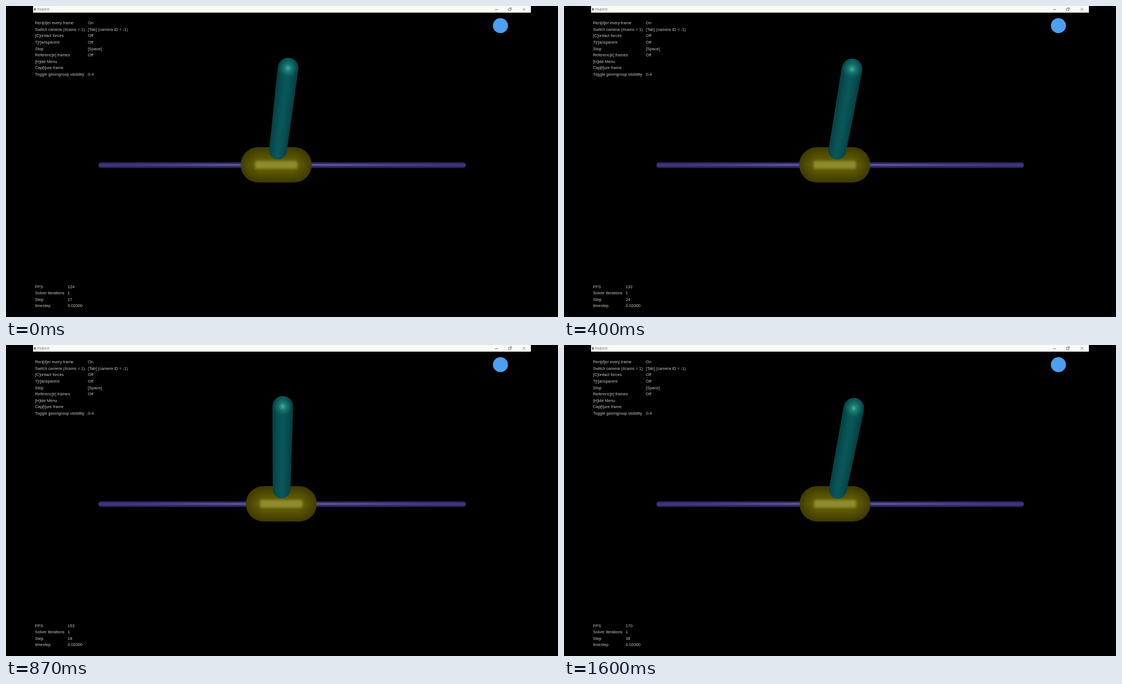
These frames come from a looping animation (997 by 562 pixels, 1.67 s). An HTML page with a canvas:

```html
<!DOCTYPE html>
<html lang="en">
<head>
<meta charset="utf-8">
<title>Inverted pendulum</title>
<style>
  html, body { margin: 0; width: 100%; height: 100%; overflow: hidden; background: #000; }
  canvas { display: block; }
</style>
</head>
<body>
<canvas id="stage" width="997" height="562"></canvas>
<script>
const ctx = document.getElementById('stage').getContext('2d');
const LOOP = 1670, TICK = 200 / 3, LAST_TICK = 24;
const AXIS_Y = 287, POLE_LENGTH = 176;

// Each phase runs until the tick where the next begins. The pole falls past
// its limit, a new episode starts upright, pauses once and falls again.
const PHASES = [
  { tick: 0, from: { cart: 488, tip: 509.5, step: 17, fps: 124 }, to: { cart: 488.3, tip: 510, step: 17, fps: 128 } },
  { tick: 4, from: { cart: 488.3, tip: 510, step: 17, fps: 128 }, to: { cart: 489.5, tip: 528, step: 27, fps: 134 } },
  { tick: 7, from: { cart: 499, tip: 498.5, step: 0, fps: 135 }, to: { cart: 499, tip: 498.5, step: 8, fps: 136 } },
  { tick: 10, from: { cart: 499, tip: 498.5, step: 8, fps: 136 }, to: { cart: 494.5, tip: 502, step: 28, fps: 170 } },
  { tick: 16, from: { cart: 494.5, tip: 502, step: 28, fps: 170 }, to: { cart: 494.5, tip: 502, step: 28, fps: 170 } },
  { tick: 21, from: { cart: 494.5, tip: 502, step: 28, fps: 170 }, to: { cart: 489.5, tip: 523.5, step: 38, fps: 170 } },
];

const MENU = [
  ['Ren[d]er every frame', 'On'],
  ['Switch camera (#cams = 1)', '[Tab] (camera ID = -1)'],
  ['[C]ontact forces', 'Off'],
  ['T[r]ansparent', 'Off'],
  ['Stop', '[Space]'],
  ['Referenc[e] frames', 'Off'],
  ['[H]ide Menu', ''],
  ['Cap[t]ure frame', ''],
  ['Toggle geomgroup visibility', '0-4'],
];

function poseAt(tick) {
  const i = PHASES.findLastIndex(phase => phase.tick <= tick);
  const { tick: begin, from, to } = PHASES[i];
  const end = PHASES[i + 1]?.tick ?? LAST_TICK;
  const linear = (tick - begin) / (end - begin);
  const falling = linear ** 1.4;
  const mix = (name, k) => from[name] + (to[name] - from[name]) * k;
  return {
    cart: mix('cart', falling),
    tip: mix('tip', falling),
    step: Math.round(mix('step', linear)),
    fps: Math.round(mix('fps', linear)),
  };
}

function shade(gradient, ...colors) {
  colors.forEach((color, i) => gradient.addColorStop(i / (colors.length - 1), color));
  return gradient;
}

function text(str, x, y, color = '#c4c4c4', size = 7.4) {
  ctx.font = `${size}px "Liberation Sans", Arial, sans-serif`;
  ctx.fillStyle = color;
  ctx.fillText(str, x, y);
}

function table(rows, top, valueX) {
  rows.forEach(([label, value], i) => {
    const y = top + i * 11.62;
    text(label, 52.5, y);
    text(value, valueX, y);
  });
}

function capsule(x, y, w, h, fill) {
  ctx.fillStyle = fill;
  ctx.beginPath();
  ctx.roundRect(x, y, w, h, h / 2);
  ctx.fill();
}

function drawWindowBar() {
  ctx.fillStyle = '#fbfbf6';
  ctx.fillRect(49, 0, 899, 12);
  ctx.fillStyle = '#555';
  ctx.fillRect(51, 4, 2.5, 4);
  text('mujoco', 56, 6.5, '#777', 7);
  ctx.strokeStyle = '#888';
  ctx.lineWidth = 1;
  ctx.beginPath();
  ctx.moveTo(883, 6.5); ctx.lineTo(889, 6.5);
  ctx.rect(907.5, 4.5, 4, 4);
  ctx.moveTo(909, 3); ctx.lineTo(913, 3); ctx.lineTo(913, 7);
  ctx.moveTo(933, 3.5); ctx.lineTo(938, 8.5);
  ctx.moveTo(938, 3.5); ctx.lineTo(933, 8.5);
  ctx.stroke();
}

function drawRail() {
  capsule(167, 282.2, 663.5, 10.6,
    shade(ctx.createLinearGradient(0, 282, 0, 293), '#1f1850', '#352b6c', '#443c80', '#352b6c', '#1f1850'));
  ctx.fillStyle = shade(ctx.createLinearGradient(230, 0, 770, 0),
    'rgba(115,108,165,0)', 'rgba(115,108,165,.6)', 'rgba(115,108,165,.6)', 'rgba(115,108,165,0)');
  ctx.fillRect(230, 285.5, 540, 3);
}

function drawCart(x) {
  capsule(x - 64, 255, 128, 64,
    shade(ctx.createLinearGradient(0, 255, 0, 319), '#3b3800', '#565200', '#6a660a', '#565200', '#3b3800'));
  capsule(x - 64, 255, 128, 64,
    shade(ctx.createLinearGradient(x - 64, 0, x + 64, 0),
      'rgba(40,38,0,.65)', 'rgba(60,56,0,0)', 'rgba(60,56,0,0)', 'rgba(60,56,0,0)', 'rgba(40,38,0,.65)'));
  ctx.save();
  ctx.filter = 'blur(2px)';
  ctx.fillStyle = 'rgba(150,147,55,.85)';
  ctx.fillRect(x - 38, 280, 76, 14);
  ctx.restore();
}

function drawPole(cart, tip) {
  const angle = Math.asin((tip - cart) / POLE_LENGTH);
  const tipY = -POLE_LENGTH, footY = -26, tipR = 18.7, footR = 16;
  ctx.save();
  ctx.translate(cart, AXIS_Y);
  ctx.rotate(angle);
  ctx.beginPath();
  ctx.arc(0, tipY, tipR, Math.PI, 0);
  ctx.arc(0, footY, footR, 0, Math.PI);
  ctx.closePath();
  ctx.fillStyle = shade(ctx.createLinearGradient(-19, 0, 19, 0),
    '#053c3e', '#074d50', '#09585a', '#074d50', '#053c3e');
  ctx.fill();
  const glow = ctx.createRadialGradient(0, tipY, 0, 0, tipY, tipR);
  ctx.fillStyle = shade(glow, 'rgba(85,175,155,.95)', 'rgba(30,133,122,.8)', 'rgba(15,112,106,.5)', 'rgba(8,85,85,0)');
  ctx.beginPath();
  ctx.arc(0, tipY, tipR, 0, Math.PI * 2);
  ctx.fill();
  ctx.restore();
}

function draw(now) {
  // The picture advances fifteen times a second.
  const tick = Math.min(LAST_TICK, Math.floor((now % LOOP + 3.4) / TICK));
  const pose = poseAt(tick);
  ctx.fillStyle = '#000';
  ctx.fillRect(0, 0, 997, 562);
  ctx.textBaseline = 'middle';
  drawWindowBar();
  table(MENU, 31, 148);
  table([
    ['FPS', pose.fps],
    ['Solver iterations', 1],
    ['Step', pose.step],
    ['timestep', '0.02000'],
  ], 507.5, 111.5);
  ctx.fillStyle = '#4d9ff2';
  ctx.beginPath();
  ctx.arc(893, 35.5, 13.6, 0, Math.PI * 2);
  ctx.fill();
  drawRail();
  drawCart(pose.cart);
  drawPole(pose.cart, pose.tip);
}

const start = performance.now();
function loop() {
  draw(performance.now() - start);
  requestAnimationFrame(loop);
}
loop();
</script>
</body>
</html>
```
